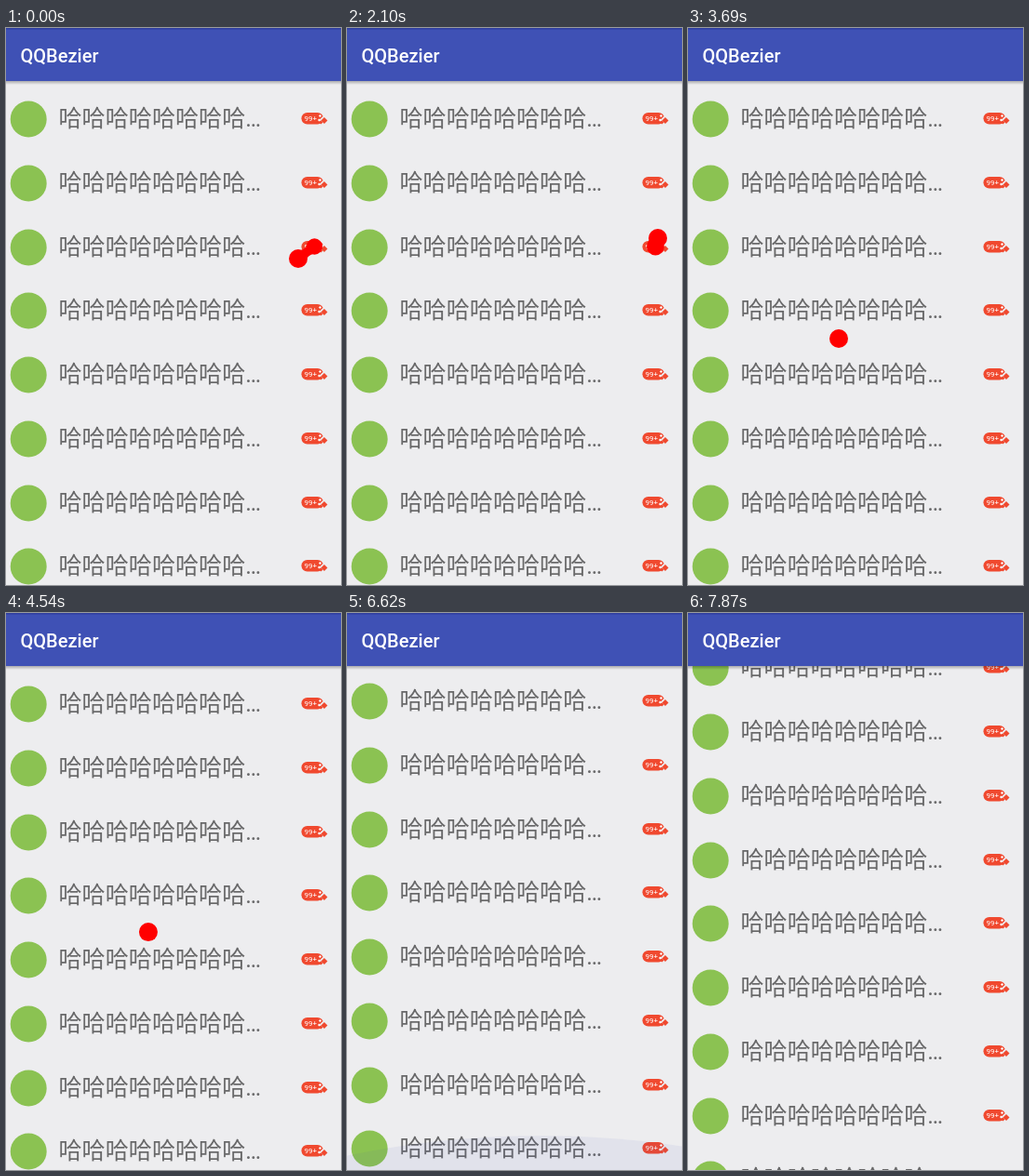
Write an HTML page with a canvas that moves like this. It is 360x599 px and loops after 8 s.

```html
<!DOCTYPE html>
<html lang="zh-CN">
<head>
<meta charset="utf-8">
<title>QQBezier</title>
<style>
  html, body { margin: 0; width: 100%; height: 100%; overflow: hidden; background: #ededef; }
  canvas { display: block; }
</style>
</head>
<body>
<canvas id="stage" width="360" height="599"></canvas>
<script>
const ctx = document.getElementById('stage').getContext('2d');
const WIDTH = 360, HEIGHT = 599, LOOP = 8000, REFRESH = 130;
const ROW_TOP = 97, ROW_PITCH = 68.75, BAR_HEIGHT = 57;
const ANCHOR = { x: 331.5, y: 235 }, BALL_RADIUS = 10, BREAK_DISTANCE = 100;
const PAPER = '#ededef', BADGE_RED = '#f0492f', BALL_RED = '#f00';

const lerp = (a, b, p) => a + (b - a) * p;
const smooth = p => p * p * (3 - 2 * p);

// Time since a motion began, in whole screen refreshes.
const elapsed = (time, start) => Math.floor((time - start) / REFRESH) * REFRESH;

function disc(x, y, radius, color) {
  ctx.fillStyle = color;
  ctx.beginPath();
  ctx.arc(x, y, radius, 0, Math.PI * 2);
  ctx.fill();
}

function diamond(x, y, r, color) {
  ctx.fillStyle = color;
  ctx.beginPath();
  ctx.moveTo(x, y - r);
  ctx.lineTo(x + r, y);
  ctx.lineTo(x, y + r);
  ctx.lineTo(x - r, y);
  ctx.fill();
}

function text(string, x, y, font, color) {
  ctx.font = font + " Roboto, 'Noto Sans CJK SC', 'Noto Sans CJK', sans-serif";
  ctx.fillStyle = color;
  ctx.fillText(string, x, y);
}

function drawBadge(y) {
  ctx.fillStyle = BADGE_RED;
  ctx.beginPath();
  ctx.roundRect(317.5, y - 6, 23.5, 12.5, 6.2);
  ctx.fill();
  text('99+', 320.5, y + 3, '8px', '#fff');
  diamond(337.5, y - 2.5, 1.5, '#fff');
  diamond(336.5, y + 2, 1.5, '#fff');
  diamond(340.5, y + 2, 4, PAPER);
  diamond(342, y + 2.5, 3.5, BADGE_RED);
  diamond(338.5, y + 4.5, 2, BADGE_RED);
}

function drawRow(y) {
  disc(24.2, y + 1, 19.5, '#8bc252');
  text('哈'.repeat(8) + '…', 56.5, y + 9, '25.1px', '#686869');
  drawBadge(y);
}

function drawBar() {
  const shadow = ctx.createLinearGradient(0, BAR_HEIGHT, 0, BAR_HEIGHT + 4);
  shadow.addColorStop(0, 'rgba(0,0,0,.28)');
  shadow.addColorStop(1, 'rgba(0,0,0,0)');
  ctx.fillStyle = shadow;
  ctx.fillRect(0, BAR_HEIGHT, WIDTH, 4);
  ctx.fillStyle = '#3f51b5';
  ctx.fillRect(0, 0, WIDTH, BAR_HEIGHT);
  ctx.fillStyle = '#303f9f';
  ctx.fillRect(0, 0, WIDTH, 1.5);
  text('QQBezier', 15.5, 37, '500 20px', '#fff');
}

// Overscroll glow: a wide ellipse that flattens and drifts right while it swells and fades.
function drawGlow(p) {
  const scale = lerp(.51, .22, p);
  const opacity = .22 * Math.sin(Math.PI * lerp(.1, 1, p));
  ctx.fillStyle = `rgba(66,78,178,${opacity})`;
  ctx.beginPath();
  ctx.ellipse(lerp(208, 288, p), HEIGHT + 468 * scale, 540, 540 * scale, 0, 0, Math.PI * 2);
  ctx.fill();
}

function drawBall(x, y) {
  const dx = x - ANCHOR.x, dy = y - ANCHOR.y;
  const distance = Math.hypot(dx, dy);
  disc(x, y, BALL_RADIUS, BALL_RED);
  if (distance > BREAK_DISTANCE) return;

  const radius = BALL_RADIUS - distance / 16;
  disc(ANCHOR.x, ANCHOR.y, radius, BALL_RED);
  if (distance < 1) return;

  // The neck is two quadratic curves pulled towards the midpoint.
  const nx = -dy / distance, ny = dx / distance;
  const midX = (x + ANCHOR.x) / 2, midY = (y + ANCHOR.y) / 2;
  ctx.beginPath();
  ctx.moveTo(ANCHOR.x + nx * radius, ANCHOR.y + ny * radius);
  ctx.quadraticCurveTo(midX, midY, x + nx * BALL_RADIUS, y + ny * BALL_RADIUS);
  ctx.lineTo(x - nx * BALL_RADIUS, y - ny * BALL_RADIUS);
  ctx.quadraticCurveTo(midX, midY, ANCHOR.x - nx * radius, ANCHOR.y - ny * radius);
  ctx.fill();
}

// A short tug that stretches out and comes back to the badge.
function drawTug(time) {
  const p = elapsed(time, 0) / 980;
  const pull = 1 - p + 2 * Math.sin(Math.PI * p);
  drawBall(ANCHOR.x - 17.5 * pull, ANCHOR.y + 13 * pull);
}

// A long drag that tears loose, then sways under the finger.
function drawDrag(time) {
  const t = elapsed(time, 2100), travel = 12 * REFRESH;
  const p = smooth(Math.min(t / travel, 1));
  const sway = 14 * Math.sin(Math.max(t - travel, 0) / 320);
  drawBall(lerp(334, 162, p) - sway, lerp(226, 334, p) + sway);
}

function draw(time) {
  const scroll = time < 6620 ? 0 : time < 7870 ? -3 : 30;

  ctx.fillStyle = PAPER;
  ctx.fillRect(0, 0, WIDTH, HEIGHT);
  for (let i = -1; i < 9; i++) drawRow(Math.round(ROW_TOP + ROW_PITCH * i) + scroll);

  if (time >= 6620 && time < 7590) drawGlow(elapsed(time, 6620) / 970);
  drawBar();
  if (time < 980) drawTug(time);
  if (time >= 2100 && time < 5630) drawDrag(time);
}

const start = performance.now();
function frame() {
  draw((performance.now() - start) % LOOP);
  requestAnimationFrame(frame);
}
frame();
</script>
</body>
</html>
```
